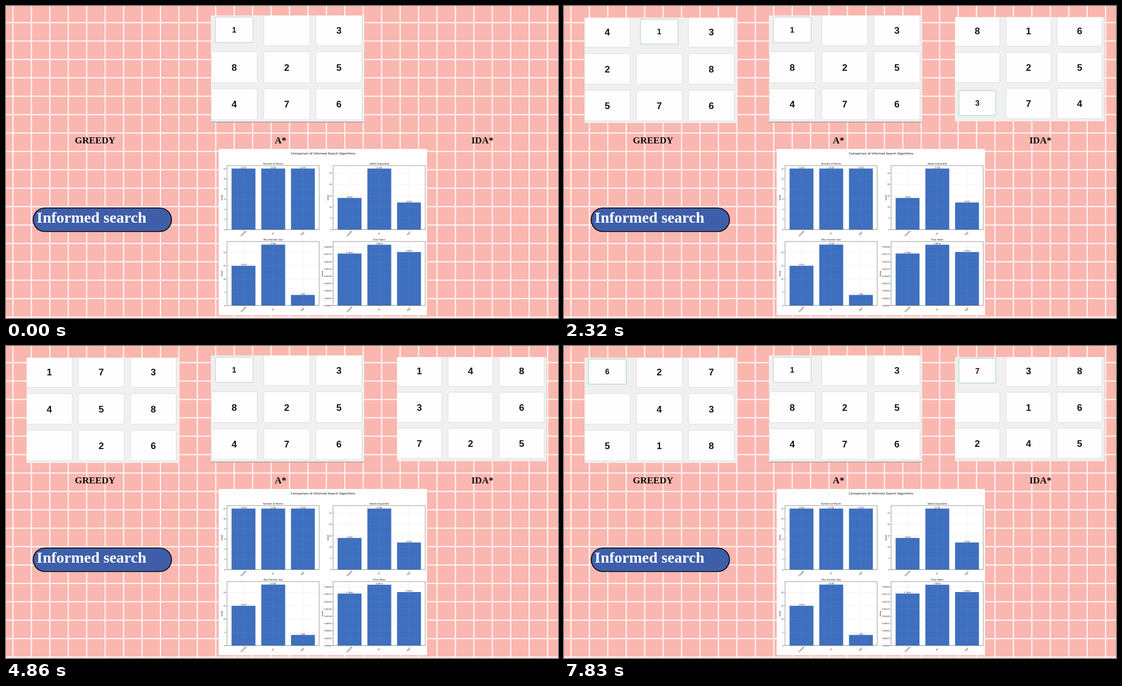
An HTML page that plays this animation: 994x563 px, repeating every 8 s.

```html
<!DOCTYPE html>
<html lang="en">
<head>
<meta charset="utf-8">
<title>Informed search</title>
<style>
  html, body { margin: 0; width: 100%; height: 100%; overflow: hidden; background: #fab7b0; }
  svg { display: block; width: 994px; height: 563px; }
  .digit { font: bold 17px "Liberation Sans", Arial, sans-serif; fill: #151515; text-anchor: middle; }
  .label { font: bold 17px "Liberation Serif", Times, serif; fill: #0c0808; }
  .pill { font: bold 28px "Liberation Serif", Times, serif; fill: #fff; }
  .chart text { font-family: "DejaVu Sans", sans-serif; fill: #111; text-anchor: middle; }
  .chart .end { text-anchor: end; }
</style>
</head>
<body>
<svg id="stage" viewBox="0 0 994 563"></svg>
<script>
const LOOP = 8000;
const MOVES_PER_STEP = 3.45;
const GRID = 33.2;
const stage = document.getElementById('stage');

function add(parent, tag, attrs, text) {
  const el = document.createElementNS('http://www.w3.org/2000/svg', tag);
  for (const key in attrs) el.setAttribute(key, attrs[key]);
  if (text !== undefined) el.textContent = text;
  parent.appendChild(el);
  return el;
}
const rect = (parent, x, y, width, height, fill, more) =>
  add(parent, 'rect', { x, y, width, height, fill, ...more });
const path = (parent, d, stroke, width) =>
  add(parent, 'path', { d, stroke, 'stroke-width': width, fill: 'none' });

// ---- Backdrop and labels ----
rect(stage, 0, 0, 994, 563, '#fab7b0');
let grid = '';
for (let x = 12.5; x < 994; x += GRID) grid += `M${x} 0V563`;
for (let y = 30; y < 563; y += GRID) grid += `M0 ${y}H994`;
path(stage, grid, '#fffaf9', 2);

[['GREEDY', 124], ['A*', 484], ['IDA*', 838]].forEach(([name, x]) =>
  add(stage, 'text', { x, y: 247.5, class: 'label' }, name));

rect(stage, 49, 364.5, 249, 42.5, '#3f5ea9', { rx: 21.2, stroke: '#05070d', 'stroke-width': 1.7 });
add(stage, 'text', { x: 55, y: 391, class: 'pill' }, 'Informed search');

// ---- Charts ----
const chart = add(stage, 'g', { class: 'chart' });
const note = (x, y, size, text, more) =>
  add(chart, 'text', { x, y, 'font-size': size, ...more }, text);

function barChart({ title, x, y, values, ticks, step, scale, places = 0, labelX, format }) {
  const w = 166, h = 115.5, base = y + h;
  const centers = [29.7, 83.2, 136.7].map(d => x + d);
  rect(chart, x, y, w, h, '#fff');
  let lines = centers.map(c => `M${c} ${y}V${base}`).join('');
  for (let i = 0; i <= ticks; i++) lines += `M${x} ${base - i * step * scale}h${w}`;
  path(chart, lines, '#e4e4e4', 0.5);
  values.forEach((v, i) => {
    const barTop = base - v * scale;
    rect(chart, centers[i] - 21.5, barTop, 43, base - barTop, '#3f6fbf');
    note(centers[i], barTop - 0.6, 3.5, format(v));
    note(centers[i], base + 8, 3.7, ['Greedy', 'A*', 'IDA*'][i],
      { transform: `rotate(-45 ${centers[i]} ${base + 7})` });
  });
  path(chart, lines, 'rgba(255,255,255,.1)', 0.5);
  let marks = centers.map(c => `M${c} ${base}v1.5`).join('');
  for (let i = 0; i <= ticks; i++) {
    const ty = base - i * step * scale;
    marks += `M${x} ${ty}h-1.5`;
    note(x - 2.5, ty + 1.3, 3.4, (i * step).toFixed(places), { class: 'end' });
  }
  path(chart, marks + `M${x} ${y}h${w}v${h}h${-w}z`, '#555', 0.6);
  note(x + w / 2, y - 2, 4.1, title);
  const mid = y + h / 2;
  note(labelX, mid, 3.8, 'Value', { transform: `rotate(-90 ${labelX} ${mid})` });
}

rect(chart, 383, 258, 375, 300, '#fff');
note(571, 267.7, 5.4, 'Comparison of Informed Search Algorithms');
const fixed = v => v.toFixed(2);
const millis = v => (v * 1000).toFixed(2) + 'ms';
barChart({ title: 'Number of Moves', x: 398, y: 288, values: [12, 12, 12],
  ticks: 6, step: 2, scale: 9.18, labelX: 390, format: fixed });
barChart({ title: 'Nodes Expanded', x: 589, y: 288, values: [14, 27, 12],
  ticks: 5, step: 5, scale: 4.08, labelX: 581, format: fixed });
barChart({ title: 'Max Frontier Size', x: 398, y: 425, values: [15, 23, 4],
  ticks: 4, step: 5, scale: 4.78, labelX: 390, format: fixed });
barChart({ title: 'Time Taken', x: 589, y: 425, values: [0.00178, 0.00208, 0.00183],
  ticks: 8, step: 0.00025, scale: 52750, places: 5, labelX: 571, format: millis });

// ---- Sliding puzzles: legal moves between key positions ----
const gapNeighbors = gap => [gap - 3, gap + 3, gap % 3 ? gap - 1 : -1, gap % 3 < 2 ? gap + 1 : -1]
  .filter(n => n >= 0 && n < 9);

function slide(board, n) {
  const cells = [...board], gap = board.indexOf('_');
  [cells[gap], cells[n]] = [cells[n], '_'];
  return cells.join('');
}

function walk(board, goal, depth, last) {
  if (depth === 0) return board === goal ? [board] : null;
  const misplaced = [...board].filter((c, i) => c !== '_' && c !== goal[i]).length;
  if (misplaced > depth) return null;
  const gap = board.indexOf('_');
  for (const n of gapNeighbors(gap)) {
    if (n === last) continue;
    const rest = walk(slide(board, n), goal, depth - 1, gap);
    if (rest) return [board, ...rest];
  }
  return null;
}

function route(from, to, steps) {
  const base = Math.round(MOVES_PER_STEP * steps);
  for (let d = 0; d < 10; d++) {
    for (const length of [base - d, base + d]) {
      const found = length > 0 && walk(from, to, length, -1);
      if (found) return found;
    }
  }
  return [from, to];
}

function expand(keys) {
  const states = [];
  keys.forEach(([start, board], i) => {
    states[start] = board;
    if (i + 1 === keys.length) return;
    const [end, next] = keys[i + 1], steps = end - start;
    const moves = route(board, next, steps);
    for (let k = 1; k < steps; k++)
      states[start + k] = moves[Math.round((moves.length - 1) * k / steps)];
  });
  return states;
}

function makeBoard({ x, y, w, h, cols, rows, cw, ch }) {
  const id = 'clip' + x;
  rect(add(stage, 'clipPath', { id }), x, y, w, h, '#000');
  const group = add(stage, 'g', { 'clip-path': `url(#${id})` });
  rect(group, x, y, w, h, '#eff0ef');
  const cells = rows.flatMap(cy => cols.map(cx => ({
    cx, cy,
    box: rect(group, 0, 0, cw, ch, '#fdfefd', { rx: 2 }),
    text: add(group, 'text', { class: 'digit', x: cx, y: cy })
  })));
  return {
    group,
    show(board, [lit = -1, color = '#bfdfc3', scale = 0.82] = []) {
      cells.forEach(({ cx, cy, box, text }, i) => {
        const on = i === lit && board[i] !== '_';
        const bw = on ? cw * scale : cw, bh = on ? ch * scale : ch;
        const attrs = { x: cx - bw / 2, y: cy - bh / 2 - (on ? 0.8 : 0), width: bw, height: bh,
          stroke: on ? color : '#dcdedc', 'stroke-width': on ? 1.5 : 1 };
        for (const key in attrs) box.setAttribute(key, attrs[key]);
        text.textContent = board[i] === '_' ? '' : board[i];
        text.style.fontSize = on ? '14px' : '17px';
        text.setAttribute('y', cy + (on ? 4.4 : 6));
      });
    }
  };
}

const middle = makeBoard({ x: 369, y: 17, w: 276, h: 192.5,
  cols: [411, 505.5, 599.5], rows: [43.7, 110.5, 177.2], cw: 83, ch: 56 });
middle.show('1_3825476', [0, '#d6d9d8']);
path(stage, 'M369 209.3H645', '#8b8585', 1);

const early = [60, 390, 860, 1390, 1860, 2320, 2850, 3310, 3860, 4320, 4860, 5320, 5850, 6310, 6840, 7300, 7830];
const late = early.map((t, i) => t + (i % 2 || i === 2 ? 70 : 0));

const players = [
  {
    times: late,
    states: expand([[0, '213578_46'], [2, '173_48256'], [4, '4132_8576'],
      [8, '_53728146'], [12, '1574632_8'], [16, '627_43518']]),
    lit: { 2: [0], 3: [6], 4: [1], 16: [0] },
    board: makeBoard({ x: 37, y: 21, w: 273, h: 190,
      cols: [78, 171.5, 265.3], rows: [47, 113.5, 179.7], cw: 82.5, ch: 55 })
  },
  {
    times: early,
    states: expand([[0, '736_85214'], [2, '2761358_4'], [5, '816_25374'],
      [8, '38_716245'], [12, '4281763_5'], [16, '738_16245']]),
    lit: { 0: [6, '#d2d6d4'], 2: [8, '#bfdfc3', 1], 4: [1], 5: [6], 13: [2], 16: [0] },
    board: makeBoard({ x: 704, y: 20, w: 269, h: 188,
      cols: [744.3, 836.5, 928.5], rows: [45.3, 110.7, 176], cw: 81, ch: 54.5 })
  }
];

// ---- Playback ----
const start = performance.now();
function tick() {
  const t = Math.max(0, performance.now() - start) % LOOP;
  for (const p of players) {
    const index = p.times.filter(s => s <= t).length - 1;
    if (index !== p.index) {
      p.index = index;
      p.board.group.style.display = index < 0 ? 'none' : '';
      if (index >= 0) p.board.show(p.states[index], p.lit[index]);
    }
  }
  requestAnimationFrame(tick);
}
tick();
</script>
</body>
</html>
```
